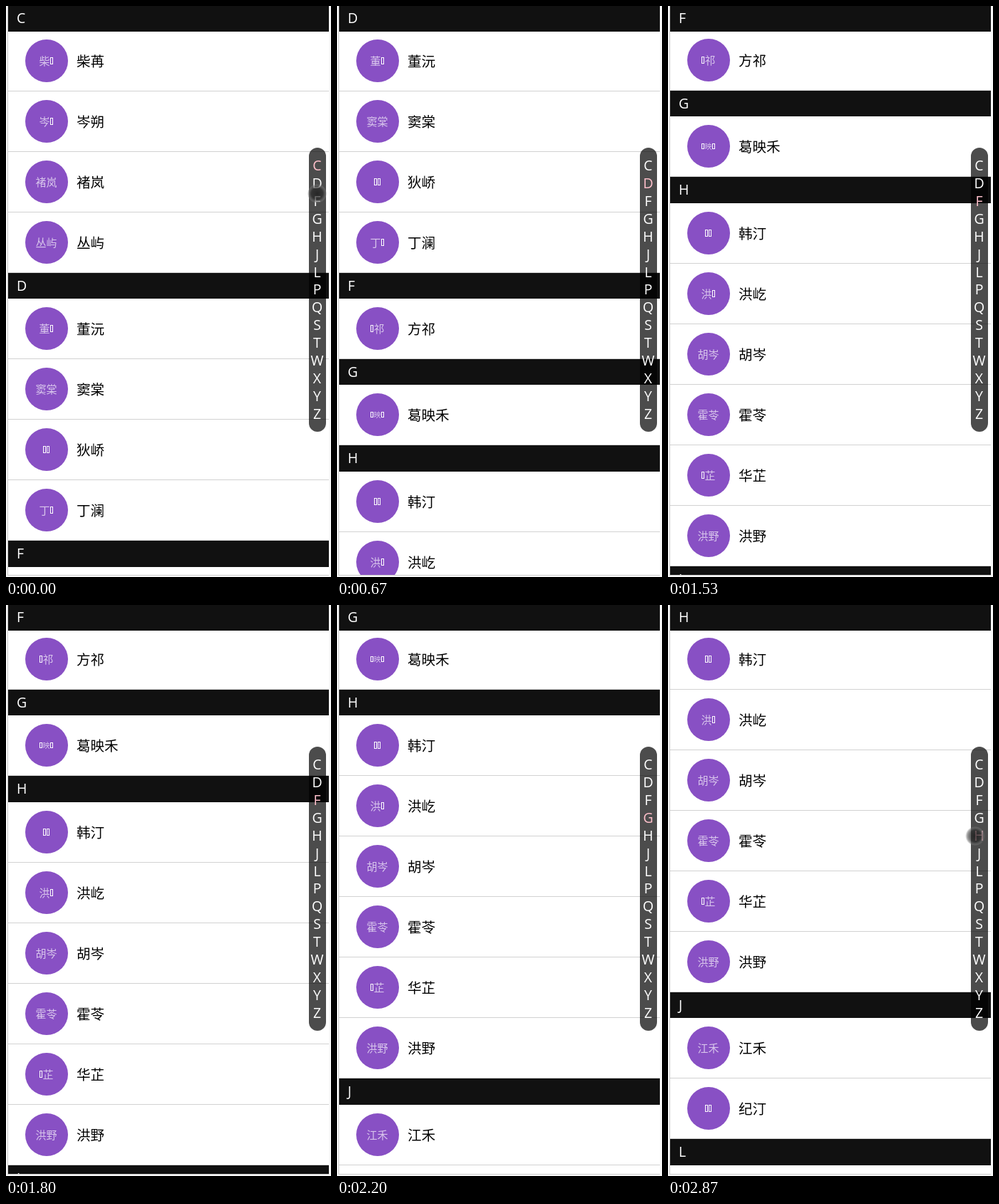
An HTML page for the animation above (2.94 s loop, 456x802 px).

```html
<!DOCTYPE html>
<html lang="zh-CN">
<head>
<meta charset="utf-8">
<title>Contacts</title>
<style>
:root { --on: #ffc0cb; --loop: 2940ms step-end infinite; }
* { box-sizing: border-box; }
html, body { margin: 0; width: 100%; height: 100%; overflow: hidden; }
body { position: relative; background: #f8f8f8; color: #000;
  font: 19.5px "Noto Sans CJK SC", "Noto Sans CJK", sans-serif; }
.view { position: absolute; left: 2px; top: 0; width: 451px; height: 800px;
  overflow: hidden; background: #fff;
  border: solid #ccc; border-width: 0 0 1px 1px; }
.list { position: absolute; left: 0; right: 0; animation: scroll var(--loop); }
.head, .pinned { background: #111; color: #fff;
  font-family: "Open Sans", "Noto Sans", sans-serif; font-weight: 500; }
.head { height: 36.4px; line-height: 36.4px; padding-left: 12px; }
.row { position: relative; height: 85px; line-height: 84px; padding-left: 96px;
  border-bottom: 1px solid #d2d2d2; white-space: nowrap; font-weight: 350; }
.face { position: absolute; left: 24px; top: 12px; width: 60px; height: 60px;
  padding-right: 1px; border-radius: 50%; background: #8850c4;
  display: flex; align-items: center; justify-content: center;
  color: rgba(255, 255, 255, .68); font-size: 15px; font-weight: 300; line-height: 20px; }
.face.small { font-size: 10px; }
.face i { width: 4.5px; height: 10px; margin: 0 .25px; border: 1px solid #fff; }
.face.small i { width: 4px; height: 8px; }
.pinned { position: absolute; left: 0; right: 0; top: 0; height: 36px; overflow: hidden; }
.pinned div { position: absolute; left: 12px; top: 0; animation: pin var(--loop); }
.pinned span { display: block; height: 36px; line-height: 33px; }
.index { position: absolute; left: 424.5px; top: 199px; width: 24px; height: 399px;
  padding-top: 13px; border-radius: 12px; background: rgba(0, 0, 0, .7); color: #fff;
  font: 500 19.5px/24.93px "Open Sans", "Noto Sans", sans-serif; text-align: center; }
.index span { display: block; height: 24.93px; margin: 0 -3px; }
.touch { position: absolute; left: -13.5px; top: -13.5px; width: 27px; height: 27px; border-radius: 50%;
  background: radial-gradient(circle closest-side, rgba(25, 25, 25, .72) 0, rgba(40, 40, 40, .66) 60%,
    rgba(100, 100, 100, .6) 82%, rgba(130, 130, 130, .35) 94%, transparent);
  animation: tap var(--loop); }

@keyframes scroll {
  0% { top: -1.4px; }
  22.789% { top: -378.2px; }
  52.04% { top: -755.2px; }
  65.646% { top: -876.6px; }
  84.013%, 100% { top: -998px; }
}
@keyframes pin {
  0% { top: 0; }
  22.789% { top: -36px; }
  52.04% { top: -72px; }
  65.646% { top: -108px; }
  84.013%, 100% { top: -144px; }
}
@keyframes on-C { 0% { color: var(--on); } 22.789%, 100% { color: #fff; } }
@keyframes on-D { 0% { color: #fff; } 22.789% { color: var(--on); } 52.04%, 100% { color: #fff; } }
@keyframes on-F { 0% { color: #fff; } 52.04% { color: var(--on); } 65.646%, 100% { color: #fff; } }
@keyframes on-G { 0% { color: #fff; } 65.646% { color: var(--on); } 84.013%, 100% { color: #fff; } }
@keyframes on-H { 0% { color: #fff; } 84.013%, 100% { color: var(--on); } }
@keyframes tap {
  0% { opacity: 1; transform: translate(436px, 263px); }
  2.38% { opacity: 0; transform: none; }
  4.421% { opacity: 1; transform: translate(431px, 259px); }
  6.802% { opacity: 0; transform: none; }
  15.986% { opacity: 1; transform: translate(442.5px, 241.5px); }
  22.789% { opacity: 0; transform: none; }
  24.829% { opacity: 1; transform: translate(442.5px, 241.5px); }
  29.591% { opacity: 0; transform: none; }
  36.394% { opacity: 1; transform: translate(442.5px, 251px); }
  38.435% { opacity: 0; transform: none; }
  43.197% { opacity: 1; transform: translate(441.5px, 258.5px); }
  45.238% { opacity: 0; transform: none; }
  58.843% { opacity: 1; transform: translate(435px, 280px); }
  61.224% { opacity: 0; transform: none; }
  68.027% { opacity: 1; transform: translate(430px, 293px); }
  74.829% { opacity: 0; transform: none; }
  92.857% { opacity: 1; transform: translate(430.5px, 324px); }
  95.238% { opacity: 0; transform: none; }
  97.619%, 100% { opacity: 1; transform: translate(430.5px, 324px); }
}
</style>
</head>
<body>
<div class="view">
  <div class="list"></div>
  <div class="pinned"><div></div></div>
</div>
<div class="index"></div>
<div class="touch"></div>
<script>
// Each entry is name/avatar label; "_" is a missing glyph.
const groups = {
  C: '柴苒/柴_ 岑朔/岑_ 褚岚/褚岚 丛屿/丛屿',
  D: '董沅/董_ 窦棠/窦棠 狄峤/__ 丁澜/丁_',
  F: '方祁/_祁',
  G: '葛映禾/_映_',
  H: '韩汀/__ 洪屹/洪_ 胡岑/胡岑 霍苓/霍苓 华芷/_芷 洪野/洪野',
  J: '江禾/江禾 纪汀/__',
  L: ''
};

const span = text => `<span>${text}</span>`;
const fill = (selector, html) => { document.querySelector(selector).innerHTML = html; };

function row(entry) {
  const [name, label] = entry.split('/');
  const small = label.length > 2 ? ' small' : '';
  const glyphs = [...label].map(c => c === '_' ? '<i></i>' : span(c)).join('');
  return `<div class="row"><div class="face${small}">${glyphs}</div>${name}</div>`;
}

fill('.list', Object.entries(groups).map(([letter, people]) =>
  `<div class="head">${letter}</div>` +
  people.split(' ').filter(Boolean).map(row).join('')).join(''));
fill('.pinned div', [...'CDFGH'].map(span).join(''));
fill('.index', [...'CDFGHJLPQSTWXYZ'].map(c =>
  `<span style="animation: on-${c} var(--loop)">${c}</span>`).join(''));
</script>
</body>
</html>
```
